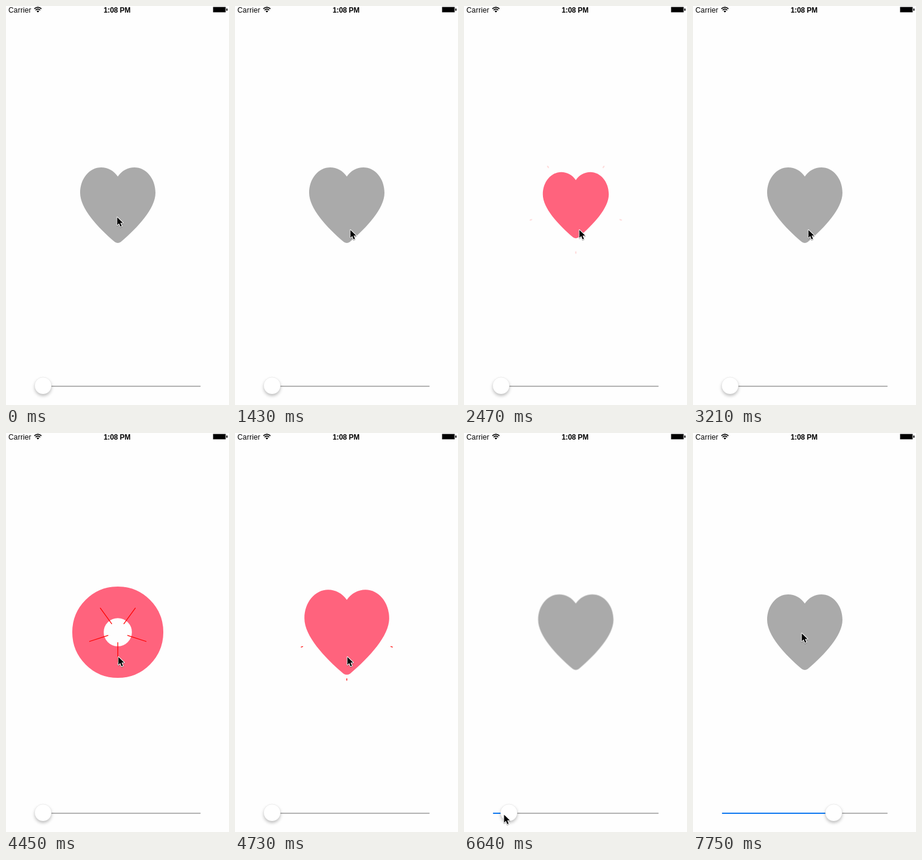
These frames come from a looping animation (370 px wide and 660 px high, 8000 ms). An HTML page:

```html
<!DOCTYPE html>
<html lang="en">
<head>
<meta charset="utf-8">
<title>Heart button</title>
<style>
  html, body { margin: 0; width: 100%; height: 100%; overflow: hidden; background: #fefefe; }
  svg { display: block; }
  text { font: 12px "Liberation Sans", Arial, sans-serif; letter-spacing: .2px; }
  .clock { font-weight: bold; letter-spacing: -.1px; }
  .thumb { fill: #fff; stroke: rgba(0, 0, 0, .13); stroke-width: .5; filter: drop-shadow(0 3px 2.5px rgba(0, 0, 0, .24)); }
  .pointer { stroke: #fff; stroke-width: 2; stroke-linejoin: round; paint-order: stroke; filter: drop-shadow(0 1px .7px rgba(0, 0, 0, .35)); }
</style>
</head>
<body>
<svg width="370" height="660" viewBox="0 0 370 660">
  <text x="4" y="11">Carrier</text>
  <g fill="none" stroke="#000" stroke-width="1.7" transform="translate(-.6 0)">
    <path d="M47.6 4.6Q53.5 -.4 59.4 4.6M49.7 6.8Q53.5 3.6 57.3 6.8"/>
    <path d="M51.3 8.4Q53.5 6.6 55.7 8.4L53.5 10.7Z" fill="#000" stroke="none"/>
  </g>
  <text class="clock" x="162" y="11">1:08 PM</text>
  <rect x="343.5" y="1.5" width="21" height="9" rx="1" stroke="#999"/>
  <rect x="365.5" y="4" width="2" height="4" rx="1"/>

  <g transform="translate(185.5 329.5)">
    <circle id="ring" fill="none" stroke="#ff637d"/>
    <g id="rays" stroke="#f00" stroke-width="1.25" stroke-linecap="round"></g>
    <path id="heart" d="M0 -47.5C-6.5 -57 -16.5 -62.5 -27.5 -62.5C-47 -62.5 -62.5 -44 -62.5 -20.5C-62.5 5.5 -33.5 36.5 -5 60.8Q0 64.2 5 60.8C33.5 36.5 62.5 5.5 62.5 -20.5C62.5 -44 47 -62.5 27.5 -62.5C16.5 -62.5 6.5 -57 0 -47.5Z"/>
  </g>

  <rect x="48" y="628" width="275" height="2" rx="1" fill="#b3b3b3"/>
  <rect id="fill" x="48" y="628" height="2" rx="1" fill="#0f78f0"/>
  <circle id="thumb" class="thumb" cy="628" r="14"/>

  <path id="pointer" class="pointer" d="M1.5 1.5V14.5L4.5 11.6L6.8 17L9 16L6.7 10.8H11Z"/>
</svg>
<script>
const LOOP = 8000, RADIUS = 62.5, RAY = 93.75;
const GREY = '#aaaaaa', PINK = '#ff637d';

// Press and release to like, press and release to unlike.
const TAPS = [
  { press: 1850, like: 1946, repress: 3090, unlike: 3210 },
  { press: 4270, like: 4344, repress: 5410, unlike: 5590 }
];

// Pointer moves: start, end, and where the pointer arrives.
const HOME = { x: 183, y: 348 };
const MOVES = [
  { from: 1340, to: 1430, x: 190, y: 369 },
  { from: 3880, to: 4100, x: 185, y: 369 },
  { from: 5200, to: 5350, x: 181, y: 373 },
  { from: 5780, to: 6380, x: 52, y: 628 },
  { from: 6380, to: 6640, x: 65, y: 630 },
  { from: 6640, to: 7100, x: 224, y: 630 },
  { from: 7100, to: 7220, x: 242, y: 622 },
  { from: 7490, to: 7750, x: 179, y: 330 }
];
const GRAB = 6380, DROP = 7100, GRIP = 9.5;

const clamp = (v, lo = 0, hi = 1) => Math.min(hi, Math.max(lo, v));
const smooth = u => (u = clamp(u), u * u * (3 - 2 * u));
const easeOut = (u, power) => 1 - (1 - clamp(u)) ** power;

// Rules of the burst; k counts thirtieths of a second since the like.
const ringScale = k => 1.4 * easeOut(k / 6, 2.6);
const holeShare = k => easeOut((k - 2.2) / 6.8, 2.3);
const rayStart = k => .82 * smooth(k / 10.5);
const rayEnd = k => .85 * easeOut((k - 1) / 16, 6.5);
const rayAlpha = k => clamp((17 - k) / 5);

// A straight rise that runs into a fading wobble around full size.
function heartScale(k) {
  const fade = 1 - (k - 10) / 20;
  const wobble = 1 + .25 * fade * fade * Math.cos(2 * Math.PI * (k - 10) / 10.8);
  return Math.max(0, Math.min((k - 3.65) * .225, wobble));
}

function pointerAt(t) {
  let { x, y } = HOME;
  for (const m of MOVES) {
    const u = smooth((t - m.from) / (m.to - m.from));
    x += (m.x - x) * u;
    y += (m.y - y) * u;
  }
  return { x, y };
}

const [ring, rays, heart, fill, thumb, pointer] =
  ['ring', 'rays', 'heart', 'fill', 'thumb', 'pointer'].map(id => document.getElementById(id));

function set(el, attrs) {
  for (const name in attrs) el.setAttribute(name, attrs[name]);
}

for (let i = 0; i < 5; i++) {
  const ray = document.createElementNS('http://www.w3.org/2000/svg', 'line');
  set(ray, { x1: 0, x2: 0, transform: `rotate(${36 + 72 * i})` });
  rays.append(ray);
}

function drawButton(t) {
  const within = (a, b) => t >= a && t < b;
  const liked = TAPS.find(p => within(p.like, p.unlike));
  const pressed = TAPS.some(p => within(p.press, p.like) || within(p.repress, p.unlike));
  const k = liked ? Math.min(30, (t - liked.like) * .03) : 30;

  const scale = heartScale(k);
  set(heart, {
    transform: `scale(${scale})`,
    fill: !liked ? GREY : scale < .03 ? '#888' : PINK,
    opacity: pressed ? .4 : 1
  });

  const outer = RADIUS * ringScale(k), inner = outer * holeShare(k);
  set(ring, {
    r: (outer + inner) / 2,
    'stroke-width': outer - inner,
    opacity: outer - inner > .01 ? 1 : 0
  });

  const start = rayStart(k), end = rayEnd(k);
  set(rays, { opacity: end > start ? rayAlpha(k) : 0 });
  for (const ray of rays.children) set(ray, { y1: -RAY * start, y2: -RAY * end });
}

function draw() {
  const t = performance.now() % LOOP;
  drawButton(t);

  const x = pointerAt(clamp(t, GRAB, DROP)).x + GRIP;
  set(thumb, { cx: x });
  set(fill, { width: x - 48 });

  const p = pointerAt(t);
  set(pointer, { transform: `translate(${Math.round(p.x)} ${Math.round(p.y)})` });
  requestAnimationFrame(draw);
}
draw();
</script>
</body>
</html>
```
